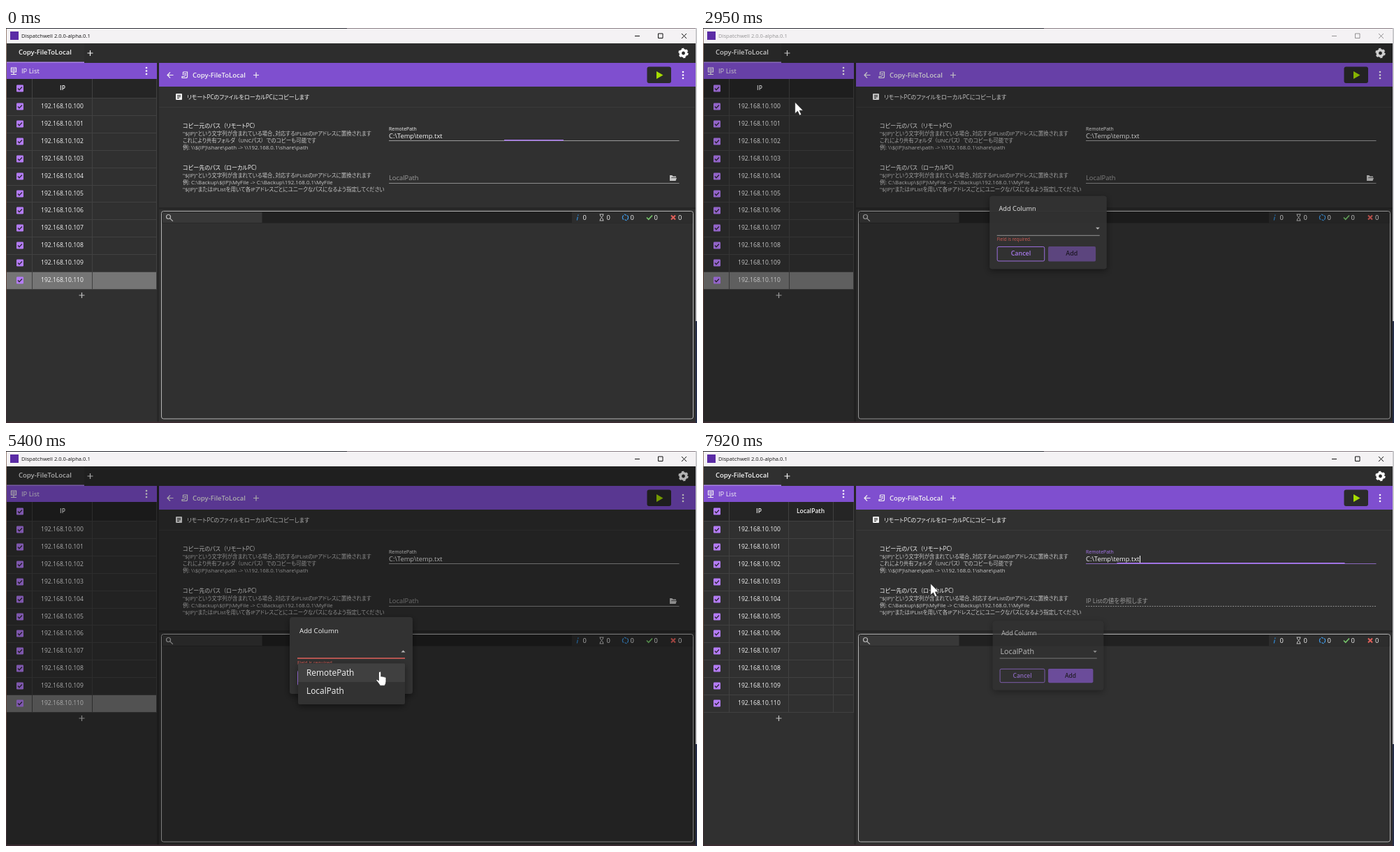
Animation, 989 px wide and 566 px high, one loop 8 s. Source, as an HTML page:

```html
<!DOCTYPE html>
<html lang="ja">
<head>
<meta charset="utf-8">
<style>
html, body { margin: 0; width: 100%; height: 100%; overflow: hidden; background: #303030; }
svg { display: block; width: 100vw; height: 100vh; }
text { font: 9.4px "Open Sans", "Noto Sans CJK JP", "Noto Sans CJK", sans-serif; font-feature-settings: "palt"; fill: #f4f4f4; white-space: pre; }
text.tab { font-size: 9.5px; font-weight: 600; }
text.ip { font-size: 8.6px; text-anchor: middle; }
text.head { font-size: 8.5px; font-weight: 600; text-anchor: middle; }
text.h { font-size: 8.1px; }
text.s { font-size: 7.5px; fill: #c8c8c8; }
text.ex { font-size: 7.9px; }
text.tiny { font-size: 6.9px; }
text.big { font-size: 11.9px; }
text.btn { font-weight: 600; text-anchor: middle; }
text.menu { font-size: 10px; }
.line { fill: none; stroke: #f2f2f2; stroke-width: 1.2; }
.grid { stroke: #414141; }
</style>
</head>
<body>
<svg viewBox="0 0 989 566">
  <defs>
    <filter id="shadow" x="-20%" y="-20%" width="140%" height="150%">
      <feDropShadow dx="0" dy="3" stdDeviation="5" flood-opacity=".45"/>
    </filter>
    <clipPath id="itemClip"><rect x="418" y="331" width="153" height="27"/></clipPath>
    <linearGradient id="desk" x1="0" y1="0" x2="0" y2="1">
      <stop stop-color="#9a8478"/><stop offset=".5" stop-color="#6b4c3c"/><stop offset="1" stop-color="#3c2d33"/>
    </linearGradient>
    <g id="dots"><circle cy="-4.5" r="1.3"/><circle r="1.3"/><circle cy="4.5" r="1.3"/></g>
    <path id="plus" class="line" d="M-4 0H4M0-4V4"/>
    <g id="box"><rect x="-5" y="-5" width="10" height="10" rx="1.2" fill="#b47cf7"/><path d="M-3 0l2 2.3 4-4.3" fill="none" stroke="#302838" stroke-width="1.3"/></g>
  </defs>

  <!-- window frame -->
  <rect width="989" height="566" fill="url(#desk)"/>
  <rect width="488" height="1" fill="#2c2c34"/><rect x="488" width="501" height="1" fill="#8a7f86"/>
  <rect x="987" width="2" height="420" fill="#c9c9cc"/><rect x="987" y="420" width="2" height="146" fill="#252d48"/>
  <rect x="1" y="1" width="986" height="563" fill="#303030"/>
  <rect x="1" y="1" width="986" height="21" fill="#f4f2f4"/>
  <rect x="6" y="5" width="12" height="12" fill="#5b2ca5"/>
  <g id="title">
    <text x="22" y="14" style="font-size:7.6px;fill:#111">Dispatchwell 2.0.0-alpha.0.1</text>
    <path d="M900 11.5h7M933.5 8h6.500v6.500h-6.500zM967 8l7 7m0-7l-7 7" fill="none" stroke="#111"/>
  </g>

  <!-- tabs -->
  <rect x="1" y="22" width="986" height="28" fill="#2d2d2d"/>
  <rect x="1" y="22" width="111" height="28" fill="#303030"/>
  <rect x="1" y="48.500" width="111" height="1.500" fill="#a882e6"/>
  <text class="tab" x="18" y="38">Copy-FileToLocal</text>
  <use href="#plus" x="120.500" y="36"/>
  <g fill="none" stroke="#fff" transform="translate(969.500 36)">
    <circle r="4.200" stroke-width="3.600"/><circle r="6.200" stroke-width="2" stroke-dasharray="3.250"/>
  </g>

  <!-- list panel -->
  <rect x="1" y="50" width="215" height="23" fill="#7f4fcf"/>
  <path class="line" d="M7.500 57h7v6h-7zM11 63v3M7 66.500h8M9 59h4M9 61h4"/>
  <text x="22" y="64.500">IP List</text>
  <use href="#dots" x="201" y="61.500" fill="#fff"/>
  <rect x="1" y="73" width="215" height="27" fill="#252525"/>
  <g id="rows"></g>
  <path id="cols" class="grid" fill="none"/>
  <use href="#box" x="20" y="86.500"/>
  <text id="ipHead" class="head" y="89">IP</text>
  <text id="newHead" class="head" x="154" y="89">LocalPath</text>
  <use href="#plus" x="108.500" y="383" opacity=".75"/>
  <rect x="216" y="50" width="3" height="514" fill="#272727"/>

  <!-- script panel -->
  <rect x="219" y="50" width="768" height="34" fill="#7f4fcf"/>
  <path class="line" d="M239.500 67.500h-8.500m4-4l-4 4 4 4"/>
  <path class="line" d="M253.500 63h6v6.500q0 2-2 2h-5.500v-2h4.500M253.500 63v4.500M255 65.500h3M255 67.500h3"/>
  <text class="tab" x="267" y="70.500">Copy-FileToLocal</text>
  <use href="#plus" x="358" y="67.500"/>
  <rect x="917.500" y="55.500" width="34.500" height="23.500" rx="3" fill="#2b2b2b"/>
  <path d="M931 62l9.500 5.500-9.500 5.500z" fill="#a6dc00"/>
  <use href="#dots" x="969" y="67.500" fill="#fff"/>
  <rect x="243" y="94" width="9" height="9" rx="1" fill="#f2f2f2"/>
  <path d="M245 96.500h5M245 98.500h5M245 100.500h3" stroke="#303030"/>
  <text class="h" x="259" y="101.500">リモートPCのファイルをローカルPCにコピーします</text>
  <path d="M219 113.500H986" stroke="#3a3a3a"/>
  <text class="h" x="253" y="142.500">コピー元のパス&ensp;（リモートPC）</text>
  <text class="s" x="253" y="153.500">"$(IP)"という文字列が含まれている場合、対応するIPListのIPアドレスに置換されます</text>
  <text class="s" x="253" y="163.500">これにより共有フォルダ&ensp;（UNCパス）&ensp;でのコピーも可能です</text>
  <text class="s ex" x="253" y="174">例: \\$(IP)\share\path -&gt; \\192.168.0.1\share\path</text>
  <text class="h" x="253" y="202.500">コピー先のパス&ensp;（ローカルPC）</text>
  <text class="s" x="253" y="213.500">"$(IP)"という文字列が含まれている場合、対応するIPListのIPアドレスに置換されます</text>
  <text class="s ex" x="253" y="223.500">例: C:\Backup\$(IP)\MyFile -&gt; C:\Backup\192.168.0.1\MyFile</text>
  <text class="s" x="253" y="234">"$(IP)"またはIPListを用いて各IPアドレスごとにユニークなパスになるよう指定してください</text>
  <text id="remoteLabel" class="tiny" x="548" y="147">RemotePath</text>
  <text x="548" y="158">C:\Temp\temp.txt</text>
  <path id="remoteBase" d="M548 161.500H963.500"/>
  <path id="remoteLine" stroke="#a877f0" stroke-width="1.600"/>
  <path id="remoteCaret" d="M625.500 150v10" stroke="#fff"/>
  <text id="local" x="548" y="217.500" style="fill:#9c9c9c"></text>
  <path id="localBase" d="M548 222.500H963.500" stroke="#8c8c8c"/>
  <path id="folder" d="M950 219v-8h3.500l1 1.500h4.500v1.500h-6.500l-1.500 4 1.300-3.200h7.700l-1.500 4.200z" fill="#c8c8c8"/>

  <!-- output panel -->
  <rect x="219" y="257" width="768" height="3" fill="#272727"/>
  <rect x="222.500" y="262.500" width="761" height="297.500" rx="3" fill="#303030"/>
  <rect x="223" y="263" width="760" height="16.500" fill="#212121"/>
  <rect x="224" y="264" width="142.500" height="15" fill="#383838"/>
  <rect x="810" y="263.500" width="172.500" height="16" fill="#2d2d2d"/>
  <rect x="222.500" y="262.500" width="761" height="297.500" rx="3" fill="none" stroke="#b4b4b4"/>
  <g class="line"><circle cx="232.500" cy="270.500" r="3" stroke="#bbb"/><path d="M234.800 272.800l4 4" stroke="#bbb"/></g>
  <path class="line" style="stroke:#2f8fe0" d="M819 267.500l-.3 1.500M818.300 270.500l-1 5"/>
  <path class="line" style="stroke:#bbb;stroke-width:1" d="M849.500 267h6M849.500 276h6M850.500 267v2l4 5v2M854.500 267v2l-4 5v2"/>
  <path class="line" style="stroke:#3f9be8" d="M884 268.500a3.600 3.600 0 0 0 0 6M889 268.500a3.600 3.600 0 0 1 0 6M885 267l3 1.500M888.500 276l-3-1.500"/>
  <path class="line" style="stroke:#76c56b;stroke-width:1.700" d="M917 271.500l2.700 2.800 5.300-5.800"/>
  <path class="line" style="stroke:#e0605a;stroke-width:2" d="M952 268.500l6 6m0-6l-6 6"/>
  <g id="counts"></g>

  <rect id="dim" x="1" y="22" width="986" height="542"/>

  <!-- dialog -->
  <g id="dialog">
    <rect x="406" y="238" width="176" height="110" rx="3.500" fill="#303030" filter="url(#shadow)"/>
    <text x="420" y="260.500" style="font-size:9.7px">Add Column</text>
    <rect id="mark" x="418" y="279" width="54" height="14.500" fill="#235f9c"/>
    <text id="value" class="big" x="418" y="290.500">LocalPath</text>
    <path id="comboBase" d="M417 297.500H571.500" stroke="#a0a0a0"/>
    <path id="comboLine" stroke-width="1.700"/>
    <path id="comboCaret" d="M418.500 280v14" stroke="#eee"/>
    <path id="arrow" fill="#bbb"/>
    <text id="error" class="tiny" x="417" y="306" style="fill:#dc6058;font-size:6.7px">Field is required.</text>
    <rect x="417.500" y="314.500" width="71" height="21.500" rx="2" fill="none" stroke="#a877f0"/>
    <text class="btn" x="453" y="328" style="fill:#b07ff8">Cancel</text>
    <rect id="addBox" x="494" y="314" width="71.500" height="22.500" rx="2"/>
    <text class="btn" x="529.500" y="328" style="fill:#1d1724">Add</text>
  </g>

  <!-- drop-down -->
  <g id="popup">
    <rect x="418" y="304" width="153" height="59" rx="2" fill="#303030" filter="url(#shadow)"/>
    <rect id="itemHover" x="418" width="153" height="26.500" fill="#fff" opacity=".07"/>
    <circle id="ripple" cx="504" cy="345" fill="#fff" opacity=".16" clip-path="url(#itemClip)"/>
    <text class="big" x="430" y="321.500">RemotePath</text>
    <text class="big" x="430" y="348">LocalPath</text>
  </g>

  <!-- context menu -->
  <g id="menu">
    <rect x="104" y="90" width="72.500" height="90" rx="2" fill="#303030" filter="url(#shadow)"/>
    <rect id="menuHover" x="104" y="100" width="72.500" height="23.500" fill="#fff"/>
    <text class="menu" x="121" y="115.500">Add</text>
    <text class="menu" x="121" y="138" style="fill:#989898">Rename</text>
    <text class="menu" x="121" y="161" style="fill:#989898">Delete</text>
  </g>

  <g id="cursor" fill="#fff" stroke="#222" stroke-width=".7">
    <path id="pointer" d="M0 0V16.500L3.800 13 6.500 19 9.200 17.800 6.500 12H11.700Z"/>
    <path id="hand" d="M-2 .8q2-2 3.300 0V7q1.500-1 2.500.3 1.600-.8 2.400.5 2.200-.6 2.300 1.200v5q0 3-2 6H0q-1.500-3-5.500-7.500 0-2.500 3.500.2z"/>
  </g>
</svg>
<script>
const LOOP = 8000, PITCH = 24.9;
const $ = id => document.getElementById(id);
const set = (id, attrs) => { for (const k in attrs) $(id).setAttribute(k, attrs[k]); };
const show = (id, on) => $(id).style.display = on ? '' : 'none';
const ramp = (t, a, b) => Math.min(1, Math.max(0, (t - a) / (b - a)));
const between = (t, a, b) => t >= a && t < b;
const out = p => 1 - (1 - p) ** 3;

// time, x, y of the pointer tip
const path = [
  [30, 620, 175], [220, 440, 146], [420, 235, 116], [610, 155, 103], [780, 128, 86],
  [880, 128, 86], [1070, 104, 88], [1600, 104, 88], [2070, 125, 96], [2170, 129, 101],
  [2200, 129, 101], [2370, 131, 106], [2950, 131, 106], [3370, 403, 183], [3440, 418, 215],
  [3540, 418, 215], [4220, 566, 289], [5240, 566, 289], [5530, 511, 338], [7500, 511, 338],
  [7920, 326, 190], [8000, 305, 180]
];
function tip(t) {
  const i = path.findIndex(p => p[0] > t);
  if (i < 1) return path[0].slice(1);
  const [a, x, y] = path[i - 1], [b, u, v] = path[i], p = ramp(t, a, b);
  return [x + (u - x) * p, y + (v - y) * p];
}

let rows = '';
for (let i = 0; i < 11; i++) {
  const y = Math.round(100 + i * PITCH);
  rows += `<rect id="row${i}" x="1" y="${y}" width="215" height="25"/>
    <path class="grid" d="M1 ${y + .5}H216M1 ${y + 25.5}H216"/>
    <use href="#box" x="20" y="${y + 12.5}"/>
    <text class="ip" x="80.500" y="${y + 14.6}">192.168.10.${100 + i}</text>`;
}
$('rows').innerHTML = rows;
$('counts').innerHTML = [825.5, 859.5, 893.5, 927.5, 962]
  .map(x => `<text x="${x}" y="275">0</text>`).join('');

const centred = (mid, half, y) => `M${mid - half} ${y}H${mid + half}`;
const columns = xs => xs.map(x => `M${x} 73V374`).join('');

function draw(t) {
  const [x, y] = tip(t);
  const added = t >= 7400, picked = t >= 6140, focused = t >= 7800;

  set('title', { opacity: between(t, 30, 1390) || between(t, 2690, 4510) ? .42 : 1 });

  // table
  const free = between(t, 30, 1390);
  for (let i = 0; i < 11; i++) {
    const hover = free && x < 215 && Math.floor((y - 100) / PITCH) === i;
    set('row' + i, { fill: i === 10 && !added ? '#757575' : hover ? '#444' : '#303030' });
  }
  set('cols', { d: columns(added ? [37.5, 122.5, 186.5, 215.5] : [37.5, 123.5, 215.5]) });
  set('ipHead', { x: added ? 80 : 81 });
  show('newHead', added);

  // form fields
  const half = focused ? 207.5 * ramp(t, 7800, 7954) : 42.5 * (1 - ramp(t, 0, 780));
  set('remoteLine', { d: centred(755.5, half, 160.8) });
  set('remoteBase', { stroke: focused ? '#8a68bd' : '#9a9a9a' });
  $('remoteLabel').style.fill = focused ? '#a877f0' : '';
  show('remoteCaret', focused);
  $('local').textContent = added ? 'IP Listの値を参照します' : 'LocalPath';
  $('local').style.fontSize = added ? '8.6px' : '';
  set('localBase', { 'stroke-dasharray': added ? '2 1.5' : 'none' });
  show('folder', !added);

  // context menu
  set('menu', { opacity: ramp(t, 1390, 1600) * (1 - ramp(t, 2690, 2850)) });
  set('menuHover', { opacity: .1 * ramp(t, 2170, 2370) });

  // dialog
  set('dim', { opacity: .3 * ramp(t, 2760, 3060) * (1 - ramp(t, 7450, 7800)) });
  const close = ramp(t, 7800, 8060), open = out(ramp(t, 2760, 3060));
  const scale = open * (1 - .46 * close * close);
  set('dialog', {
    opacity: open * (1 - .62 * close),
    transform: `translate(494 293) scale(${scale}) translate(-494 -293)`
  });
  const inCombo = between(t, 4510, 7400);
  show('value', picked);
  show('mark', picked && inCombo);
  show('error', !picked);
  show('comboBase', !inCombo);
  show('comboLine', inCombo);
  set('comboLine', { d: centred(494, 77 * ramp(t, 4510, 4675), 297), stroke: picked ? '#a877f0' : '#e0605a' });
  show('comboCaret', inCombo && !picked && (t - 4510) % 1060 < 530);
  set('arrow', { d: between(t, 4510, 6180) ? 'M565.500 288.500h6l-3-3z' : 'M565.500 285.500h6l-3 3z' });
  set('addBox', { fill: picked ? '#8458c6' : '#5f4783' });

  // drop-down
  set('popup', { opacity: ramp(t, 4510, 4750) * (1 - ramp(t, 6180, 6420)) });
  show('itemHover', between(t, 5300, 6500) && y > 304);
  set('itemHover', { y: y < 331 ? 304.5 : 331 });
  set('ripple', { r: 40 * ramp(t, 6110, 6300) });

  // pointer
  const hand = between(t, 5400, 7540);
  show('cursor', t >= 30);
  show('pointer', !hand);
  show('hand', hand);
  set('cursor', { transform: `translate(${x} ${y})` });
}

function tick(now) {
  draw(now % LOOP);
  requestAnimationFrame(tick);
}
draw(0);
requestAnimationFrame(tick);
</script>
</body>
</html>
```
